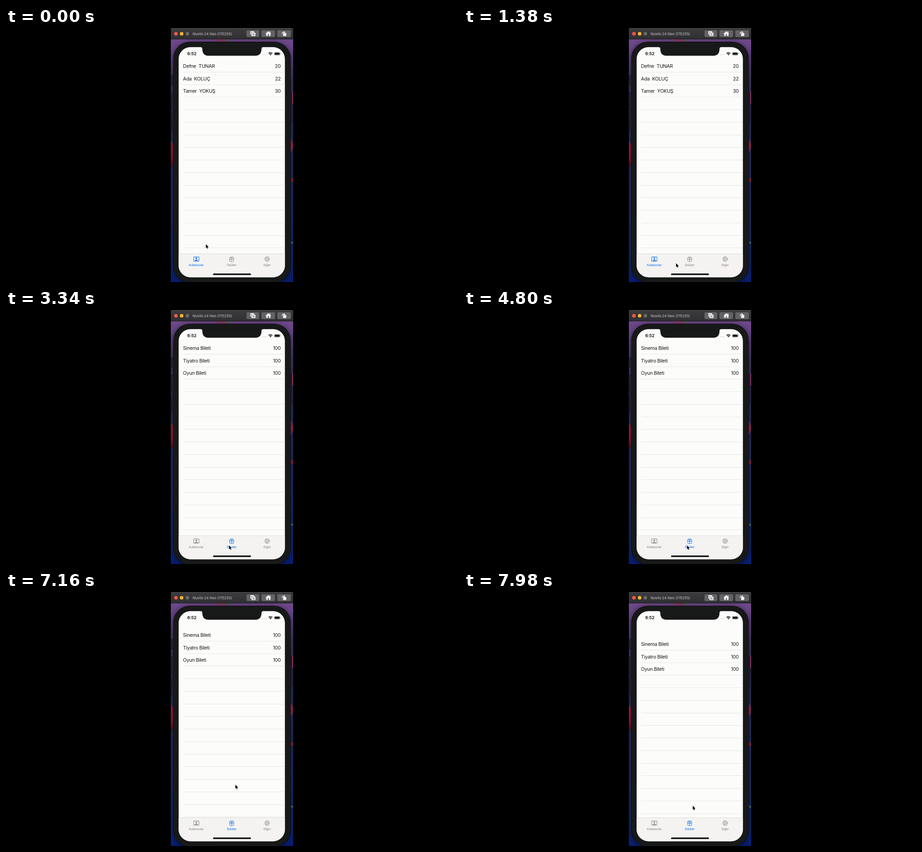
Animation of 998 by 561 pixels, one loop 8 s. Source, as an HTML page with a canvas:

```html
<!DOCTYPE html>
<html lang="tr">
<head>
<meta charset="utf-8">
<title>Liste ve sekmeler</title>
<style>
html, body { margin: 0; width: 100%; height: 100%; overflow: hidden; background: #000; }
canvas { display: block; width: 998px; height: 561px; }
</style>
</head>
<body>
<canvas id="stage" width="998" height="561"></canvas>
<script>
const ctx = document.getElementById('stage').getContext('2d');
const LOOP = 8000;
const SWITCH = 2200;
const ROW = 27.74;
const BLUE = '#1f7be6';
const GREY = '#8f8f8f';

const people = [['Defne  TUNAR', '20'], ['Ada  KOLUÇ', '22'], ['Tamer  YOKUŞ', '30']];
const prizes = [['Sinema Bileti', '100'], ['Tiyatro Bileti', '100'], ['Oyun Bileti', '100']];

// Keys: time, then values; eased between neighbours.
const pointerKeys = [
  [0, 441.3, 477.5], [350, 441.3, 477.5], [1380, 468.2, 519.5], [1900, 492.4, 519.7],
  [5840, 492.4, 519.7], [6020, 492.4, 518.2], [6700, 506.5, 406], [6800, 506.5, 406],
  [7160, 506.4, 425.5], [7980, 505, 472], [8000, 505, 472]
];
const pullKeys = [[0, 0], [6800, 0], [7160, 11], [7980, 31], [8000, 31]];

function sample(keys, t) {
  let i = 1;
  while (i < keys.length - 1 && t > keys[i][0]) i++;
  const a = keys[i - 1], b = keys[i];
  const u = Math.min(1, Math.max(0, (t - a[0]) / (b[0] - a[0])));
  const e = u * u * (3 - 2 * u);
  return a.slice(1).map((v, k) => v + (b[k + 1] - v) * e);
}

function rect(x, y, w, h, color) {
  ctx.fillStyle = color;
  ctx.fillRect(x, y, w, h);
}

function round(x, y, w, h, r, color) {
  ctx.beginPath();
  ctx.roundRect(x, y, w, h, r);
  ctx.fillStyle = color;
  ctx.fill();
}

function oval(x, y, rx, ry, color) {
  ctx.beginPath();
  ctx.ellipse(x, y, rx, ry, 0, 0, Math.PI * 2);
  ctx.fillStyle = color;
  ctx.fill();
}

function line(color, width, ...paths) {
  ctx.strokeStyle = color;
  ctx.lineWidth = width;
  ctx.beginPath();
  for (const p of paths)
    for (let i = 0; i < p.length; i += 2) ctx[i ? 'lineTo' : 'moveTo'](p[i], p[i + 1]);
  ctx.stroke();
}

function shape(points, color) {
  ctx.beginPath();
  for (let i = 0; i < points.length; i += 2) ctx.lineTo(points[i], points[i + 1]);
  ctx.closePath();
  ctx.fillStyle = color;
  ctx.fill();
}

function text(str, x, y, size, color, align = 'left', weight = 400, spacing = 0) {
  ctx.font = `${weight} ${size}px Inter, "Open Sans", sans-serif`;
  ctx.letterSpacing = spacing + 'px';
  ctx.textAlign = align;
  ctx.fillStyle = color;
  ctx.fillText(str, x, y);
}

function gradient(y0, y1, stops) {
  const g = ctx.createLinearGradient(0, y0, 0, y1);
  stops.forEach(([at, color]) => g.addColorStop(at, color));
  return g;
}

function wallpaper() {
  rect(364, 24, 270, 537, gradient(24, 561, [
    [0, '#70498a'], [0.08, '#5f4284'], [0.17, '#433763'], [0.3, '#302e5b'],
    [0.5, '#272c62'], [0.75, '#1a2b66'], [0.92, '#0f2870'], [1, '#071d74']
  ]));
  oval(480, 25, 17, 6, '#853d66');
  oval(491, 26, 5, 3, '#486855');
  oval(363, 279, 8, 30, gradient(249, 309, [[0, '#a81d49'], [0.6, '#92183f'], [1, '#500b1e']]));
  oval(636, 154, 7, 15, '#ad4078');
  oval(626, 260, 7.5, 16, '#ab2850');
  oval(631, 336, 4, 4, '#8f203b');
  line('#447a64', 3, [627, 472, 635, 476]);
}

function titleBar() {
  rect(364, 0, 270, 24.5, gradient(0, 24, [[0, '#454447'], [0.1, '#3b3a3d'], [1, '#302f32']]));
  rect(364, 24, 270, 1, '#1c1820');
  ['#f0594f', '#f2b52f', '#6a696c'].forEach((c, i) => oval(375.2 + i * 12.6, 12.7, 3.9, 3.9, c));
  text('Nuvilo 24 Neo (17E255)', 412, 15.8, 8, '#b3b2b4', 'left', 500, -0.12);
  [[531, 28], [564, 30], [599, 30]].forEach(([x, w]) => round(x, 5, w, 15, 3, '#636265'));

  const white = '#f2f2f2', gap = '#636265';
  // camera over a screen
  round(539.5, 7, 8.5, 8, 1, white);
  round(541.2, 9.5, 10, 8.8, 1.3, gap);
  round(542, 10.2, 8.8, 7.5, 1.2, white);
  rect(545, 9.5, 3, 1.2, white);
  oval(546.4, 14, 2.2, 2.2, gap);
  oval(546.4, 14, 1.3, 1.3, white);
  // home
  shape([572.8, 12.8, 579.2, 7, 585.6, 12.8, 584, 12.8, 584, 17.5, 574.5, 17.5, 574.5, 12.8], white);
  rect(582.2, 7.8, 1.6, 3, white);
  rect(578, 13.5, 2.5, 4, gap);
  // rotate
  round(611.8, 10.8, 7, 7, 1, white);
  line(white, 1.2, [610, 13.5, 610, 9.3, 614, 9.3]);
  shape([613.2, 6.8, 616.6, 9.3, 613.2, 11.6], white);
}

function phone() {
  ctx.save();
  ctx.shadowColor = 'rgba(0, 0, 0, 0.55)';
  ctx.shadowBlur = 14;
  ctx.shadowOffsetY = 2;
  round(369.3, 30.5, 259.4, 532, 37, '#0b0b0d');
  ctx.restore();
  [[104, 23], [143, 39], [187, 39]].forEach(([y, h]) => {
    round(365.2, y, 5, h, 1.5, '#11101a');
    round(366.2, y + 1, 3.2, h - 2, 1, '#242136');
  });
  round(628.5, 142, 3.5, 66, 1.5, '#11101a');
  round(629, 143, 2, 64, 1, '#242136');
  round(370.5, 32, 257, 529.5, 35.5, '#1b1c1c');
  round(372, 33.5, 254, 526.5, 34, '#171818');
}

function notch() {
  ctx.beginPath();
  ctx.moveTo(430, 41);
  ctx.lineTo(430, 42.3);
  ctx.quadraticCurveTo(433.4, 42.6, 433.4, 46);
  ctx.bezierCurveTo(433.4, 56, 438, 61.3, 447, 61.3);
  ctx.lineTo(550.5, 61.3);
  ctx.bezierCurveTo(559.5, 61.3, 564.2, 56, 564.2, 46);
  ctx.quadraticCurveTo(564.2, 42.6, 567.6, 42.3);
  ctx.lineTo(567.6, 41);
  ctx.closePath();
  ctx.fillStyle = '#171818';
  ctx.fill();
}

function status() {
  text('6:52', 400.2, 60.3, 9.5, '#111', 'left', 600, -0.1);
  for (let i = 0; i < 4; i++) oval(566.2 + i * 2.9, 59.2, 0.75, 0.75, '#b5b5b5');
  ctx.strokeStyle = '#111';
  ctx.lineWidth = 1.4;
  for (const r of [3.5, 5.9]) {
    ctx.beginPath();
    ctx.arc(584, 60.2, r, -Math.PI * 0.76, -Math.PI * 0.24);
    ctx.stroke();
  }
  shape([584, 60.6, 582.3, 58.7, 584, 58, 585.7, 58.7], '#111');
  ctx.strokeStyle = '#8d8d8d';
  ctx.lineWidth = 0.7;
  ctx.beginPath();
  ctx.roundRect(592.2, 53.5, 13, 6.8, 2);
  ctx.stroke();
  round(593.2, 54.5, 11, 4.8, 1.1, '#111');
  rect(606, 55.8, 0.9, 2.2, '#8d8d8d');
}

function list(rows, pull) {
  ctx.save();
  ctx.beginPath();
  ctx.rect(381, 62, 235, 436);
  ctx.clip();
  for (let i = 0; i < 15; i++) rect(391, Math.round(97.5 + i * ROW + pull - 0.5), 225, 1, '#e6e6e5');
  rows.forEach(([name, value], i) => {
    const y = 87.9 + i * ROW + pull;
    text(name, 390.8, y, 10.65, '#171717', 'left', 400, -0.26);
    text(value, 606.4, y, 10.65, '#171717', 'right', 400, -0.26);
  });
  ctx.restore();
}

function personIcon(x, y, c) {
  ctx.strokeStyle = c;
  ctx.lineWidth = 1.1;
  ctx.beginPath();
  ctx.roundRect(x - 5.9, y - 4.7, 11.8, 9.6, 1.3);
  ctx.stroke();
  oval(x, y - 1.3, 1.7, 2, c);
  ctx.beginPath();
  ctx.ellipse(x, y + 4.3, 3.6, 2.9, 0, Math.PI, 0);
  ctx.fill();
}

function giftIcon(x, y, c) {
  ctx.strokeStyle = c;
  ctx.lineWidth = 1;
  ctx.beginPath();
  ctx.roundRect(x - 5.2, y - 2.6, 10.4, 2.9, 0.8);
  ctx.roundRect(x - 4.3, y + 0.3, 8.6, 5.1, 1);
  ctx.moveTo(x, y - 2.6);
  ctx.lineTo(x, y + 5.4);
  for (const s of [-1, 1]) {
    ctx.moveTo(x, y - 2.6);
    ctx.bezierCurveTo(x + s * 0.4, y - 6.4, x + s * 4, y - 6.2, x + s * 3.3, y - 2.6);
  }
  ctx.stroke();
}

function gearIcon(x, y, c) {
  ctx.strokeStyle = c;
  ctx.lineWidth = 1.2;
  ctx.beginPath();
  ctx.arc(x, y, 4.6, 0, Math.PI * 2);
  ctx.stroke();
  for (let i = 0; i < 12; i++) {
    const a = i * Math.PI / 6, dx = Math.cos(a), dy = Math.sin(a);
    line(c, 0.9, [x + dx * 4.8, y + dy * 4.8, x + dx * 5.8, y + dy * 5.8]);
  }
  for (const a of [0, 2.09, 4.19])
    line(c, 1, [x + Math.cos(a) * 1.2, y + Math.sin(a) * 1.2, x + Math.cos(a) * 4.4, y + Math.sin(a) * 4.4]);
  ctx.beginPath();
  ctx.arc(x, y, 1.5, 0, Math.PI * 2);
  ctx.stroke();
}

const tabs = [
  ['Kullanıcılar', 420.2, personIcon],
  ['Ödüller', 498.3, giftIcon],
  ['Diğer', 576.6, gearIcon]
];

function tabBar(active) {
  rect(381, 498, 235, 54, '#f4f3f1');
  rect(381, 498, 235, 1, '#dededd');
  tabs.forEach(([label, x, icon], i) => {
    const c = i === active ? BLUE : GREY;
    icon(x, 510.3, c);
    text(label, x, 526.4, 6.3, c, 'center', 500, -0.05);
  });
  round(457, 542.2, 84, 3.4, 1.7, '#080808');
}

function pointer(x, y) {
  ctx.save();
  ctx.translate(x, y);
  ctx.beginPath();
  [[0, 0], [0, 9], [2, 7.1], [3.4, 10.3], [4.9, 9.6], [3.5, 6.5], [6.2, 6.3]]
    .forEach(p => ctx.lineTo(...p));
  ctx.closePath();
  ctx.lineJoin = 'round';
  ctx.lineWidth = 1.4;
  ctx.strokeStyle = '#fff';
  ctx.stroke();
  ctx.fillStyle = '#080808';
  ctx.fill();
  ctx.restore();
}

function draw(t) {
  const second = t >= SWITCH;
  rect(0, 0, 998, 561, '#000');
  ctx.save();
  ctx.beginPath();
  ctx.roundRect(364, 0, 270, 570, 3);
  ctx.clip();
  wallpaper();
  phone();
  titleBar();
  ctx.save();
  ctx.beginPath();
  ctx.roundRect(381.2, 42.3, 234.6, 508.1, 26);
  ctx.clip();
  rect(381, 42, 235, 510, '#fcfcfb');
  list(second ? prizes : people, sample(pullKeys, t)[0]);
  tabBar(second ? 1 : 0);
  status();
  ctx.restore();
  notch();
  ctx.restore();
  pointer(...sample(pointerKeys, t));
}

function tick() {
  draw(performance.now() % LOOP);
  requestAnimationFrame(tick);
}
tick();
</script>
</body>
</html>
```
